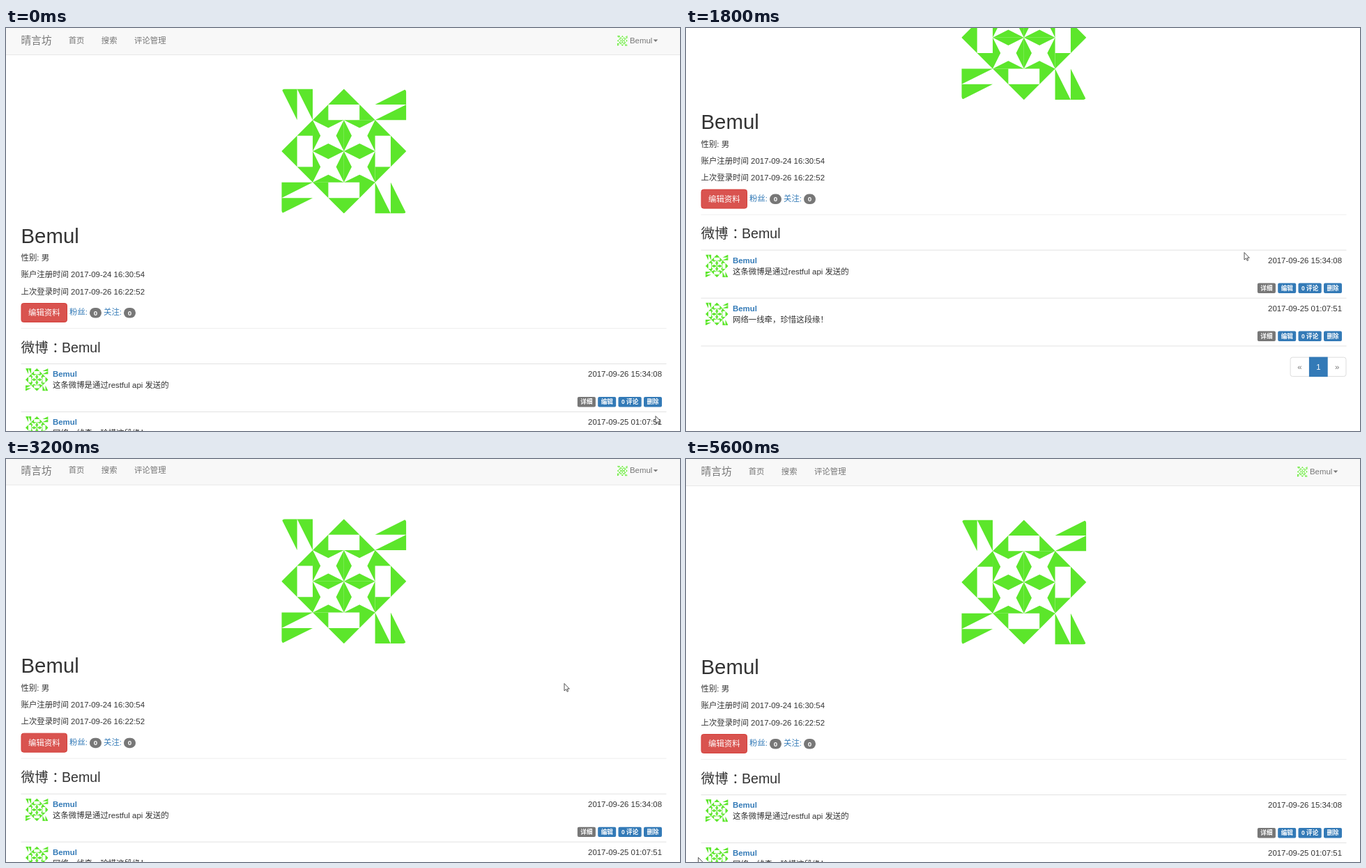
These frames come from a looping animation (967x579 px, 5900 ms). An HTML page:

```html
<!DOCTYPE html>
<html lang="zh-CN">
<head>
<meta charset="utf-8">
<title>个人主页</title>
<style>
  html, body { margin: 0; width: 100%; height: 100%; overflow: hidden; background: #fff; }
  svg { display: block; width: 967px; height: 579px; }
  text {
    font-family: "Liberation Sans", Arial, "Noto Sans CJK SC", "Noto Sans CJK", sans-serif;
    font-size: 11.42px; fill: #333; white-space: pre;
  }
</style>
</head>
<body>
<svg viewBox="0 0 967 579">
  <defs>
    <path id="quarter" d="M0 0H.5V1Z M.5 0H1V1Z M1 1L2 0L3 1H2.5V.5H1.5V1Z
      M1 1H2L1.5 1.25Z M2 1V2L1.75 1.5Z M2 2H1L1.5 1.75Z M1 2V1L1.25 1.5Z"/>
    <clipPath id="rounded"><rect width="4" height="4" rx=".11"/></clipPath>
    <g id="identicon" fill="#5ce62b" clip-path="url(#rounded)">
      <rect width="4" height="4" fill="#fff"/>
      <use href="#quarter"/>
      <use href="#quarter" transform="rotate(90 2 2)"/>
      <use href="#quarter" transform="rotate(180 2 2)"/>
      <use href="#quarter" transform="rotate(270 2 2)"/>
    </g>
  </defs>
  <g id="page"></g>
  <path id="cursor" d="M.5 .5V11L3 8.8L4.7 12.3L6.2 11.6L4.6 8.2H7.8Z" fill="#fff" stroke="#333" stroke-width=".85"/>
</svg>
<script>
const SVG = 'http://www.w3.org/2000/svg';
const page = document.getElementById('page');
const cursor = document.getElementById('cursor');
const USER = 'Bemul', BLUE = '#337ab7', GREY = '#777', LINE = '#e2e2e2';
const LEFT = 21.5, RIGHT = 947.5;

function add(tag, attrs, content) {
  const el = document.createElementNS(SVG, tag);
  for (const key in attrs) el.setAttribute(key, attrs[key]);
  if (content) el.textContent = content;
  page.appendChild(el);
}

const text = (x, y, content, fill = '#333', style = '', anchor = 'start') =>
  add('text', { x, y, style: `fill:${fill};${style}`, 'text-anchor': anchor }, content);
const box = (x, y, width, height, fill, rx = 0, stroke = 'none') =>
  add('rect', { x, y, width, height, fill, rx, stroke });
const rule = (y, color) => box(LEFT, y, RIGHT - LEFT, 1, color);
const avatar = (x, y, size) =>
  add('use', { href: '#identicon', transform: `translate(${x} ${y}) scale(${size / 4})` });

function drawNavbar() {
  box(0, -4, 967, 42, '#f8f8f8');
  box(0, 38, 967, 1, '#e7e7e7');
  text(LEFT, 23, '晴言坊', GREY, 'font-size:14.7px;font-weight:300');
  let x = 89.7;
  for (const item of ['首页', '搜索', '评论管理']) {
    text(x, 21.5, item, GREY);
    x += item.length * 11.42 + 24.3;
  }
  avatar(877, 11, 14.7);
  text(895, 21.5, USER, GREY);
  add('path', { d: 'M928.7 16.5h6.6l-3.3 3.4z', fill: GREY });
}

function drawCounter(x, label) {
  text(x, 412, label, BLUE);
  box(x + 29, 402, 17, 14.5, GREY, 7.25);
  text(x + 37.5, 412.7, '0', '#fff', 'font-size:9.8px;font-weight:bold', 'middle');
}

function drawProfile() {
  avatar(395.3, 87.6, 179);
  text(LEFT, 308.5, USER, '#333', 'font-size:29.4px');
  ['性别: 男', '账户注册时间 2017-09-24 16:30:54', '上次登录时间 2017-09-26 16:22:52']
    .forEach((row, i) => text(LEFT, 334 + 24.4 * i, row));
  box(22, 395.5, 65.5, 27, '#d9534f', 3.3, '#d43f3a');
  text(54.8, 413, '编辑资料', '#fff', '', 'middle');
  drawCounter(91, '粉丝:');
  drawCounter(140, '关注:');
  rule(431, '#eee');
  const heading = 'font-size:19.6px;font-weight:300';
  text(LEFT, 465.6, '微博', '#333', heading);
  text(66, 465.6, '：', '#333', heading);
  text(80, 465.6, USER, '#333', heading);
}

function drawPost(top, message, date) {
  rule(top, LINE);
  avatar(28, top + 7, 32.6);
  text(67, top + 19, USER, BLUE, 'font-weight:bold');
  text(67, top + 35.3, message);
  text(941, top + 19, date, '#333', '', 'end');
  let right = 941;
  for (const name of ['删除', '0 评论', '编辑', '详细']) {
    const width = name.length > 2 ? 33.2 : 26;
    box(right - width, top + 48, width, 14.4, name === '详细' ? GREY : BLUE, 2);
    text(right - width / 2, top + 58.3, name, '#fff', 'font-size:8.57px;font-weight:bold', 'middle');
    right -= width + 3.3;
  }
}

function drawPager() {
  const cell = 26.8, x = RIGHT - 3 * cell, y = 636.5;
  box(x, y, 3 * cell - .5, 27.5, '#fff', 3.3, '#ddd');
  box(x + cell, y - .5, cell, 28.5, BLUE);
  ['«', '1', '»'].forEach((label, i) =>
    text(x + cell * (i + .5), y + 18, label, label === '1' ? '#fff' : GREY, '', 'middle'));
}

drawProfile();
drawPost(482, '这条微博是通过restful api 发送的', '2017-09-26 15:34:08');
drawPost(551, '网络一线牵，珍惜这段缘！', '2017-09-25 01:07:51');
rule(619.8, LINE);
drawPager();
drawNavbar();

const LOOP = 5900, FRAME = 100, NOTCH = 81.7;
const clamp = p => Math.min(1, Math.max(0, p));
const smooth = p => p * p * (3 - 2 * p);
const easeIn = p => p * p;
const easeOut = power => p => 1 - (1 - p) ** power;
const linear = p => p;

// Every turn of the wheel moves the page by one notch.
const wheel = [
  { start: 986, length: 130, turn: 1 },
  { start: 1599.4, length: 230, turn: 1 },
  { start: 2400, length: 230, turn: -1 },
  { start: 3052, length: 230, turn: -1 },
];

// Each move bends from the last point past `via` to `to`.
const home = [931.5, 557];
const moves = [
  { start: 0, end: 600, ease: smooth, via: [866, 439], to: [800.5, 322] },
  { start: 3700, end: 4400, ease: easeIn, via: [323, 147], to: [183, 278] },
  { start: 4400, end: 4600, ease: linear, via: [100, 325], to: [50, 396] },
  { start: 4600, end: 4900, ease: linear, via: [491, 464], to: [932, 532] },
  { start: 4900, end: 5600, ease: easeOut(3), via: [480, 450], to: [17.2, 572] },
];

function scrollAt(time) {
  const ease = easeOut(4);
  return wheel.reduce((sum, { start, length, turn }) =>
    sum + turn * NOTCH * ease(clamp((time - start) / length)), 0);
}

function cursorAt(time) {
  return moves.reduce((from, { start, end, ease, via, to }) => {
    const p = ease(clamp((time - start) / (end - start))), q = 1 - p;
    return from.map((v, i) => q * q * v + 2 * p * q * via[i] + p * p * to[i]);
  }, home);
}

function render(now) {
  const time = Math.floor(now % LOOP / FRAME) * FRAME;
  const [x, y] = cursorAt(time);
  page.setAttribute('transform', `translate(0 ${-scrollAt(time)})`);
  cursor.setAttribute('transform', `translate(${x} ${y})`);
}

function loop() {
  render(performance.now());
  requestAnimationFrame(loop);
}
loop();
</script>
</body>
</html>
```
